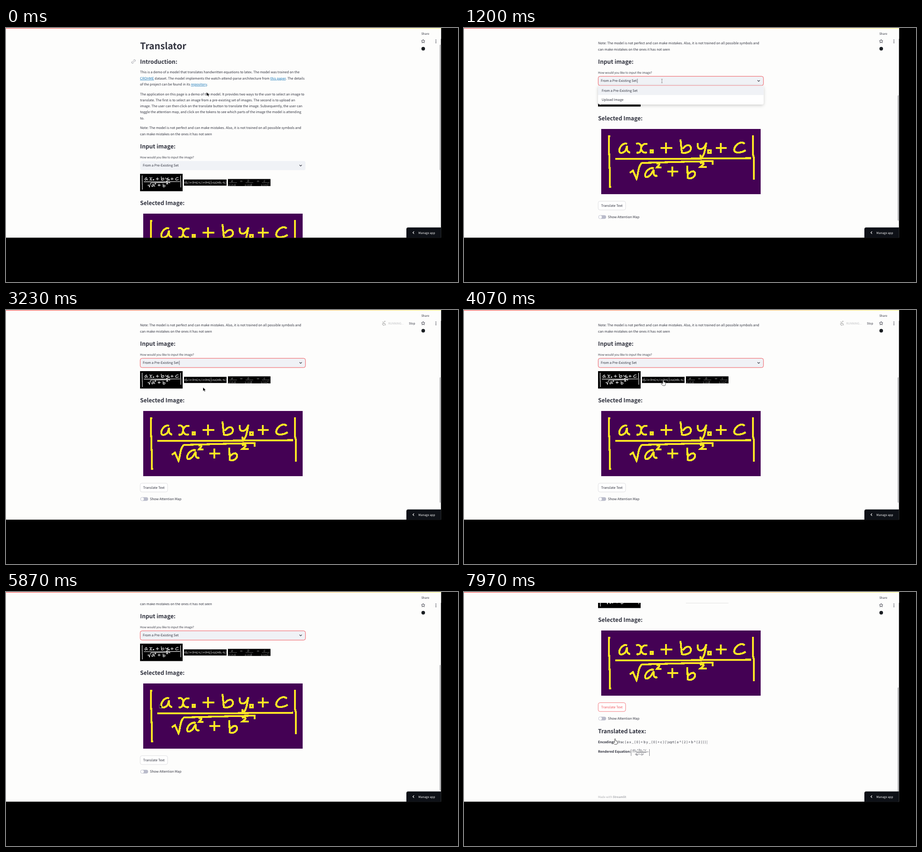
Write an HTML page that moves like this. It is 998x561 px and loops after 8 s.

```html
<!DOCTYPE html>
<html lang="en">
<head>
<meta charset="utf-8">
<title>Translator</title>
<style>
html, body { margin: 0; height: 100%; overflow: hidden; background: #000; }
svg { display: block; width: 100vw; height: 100vh; }
text {
  font: 7.42px "Noto Sans CJK JP", "Noto Sans CJK SC", "Noto Sans CJK", "Noto Sans", sans-serif;
  fill: #31333f; text-rendering: geometricPrecision; white-space: pre;
}
.bold { font-weight: 700; }
.link { fill: #1a78b8; text-decoration: underline; }
.ink { fill: none; stroke: currentColor; }
.math { font-family: "Liberation Serif", serif; font-style: italic; }
.sine { font-family: "Liberation Sans", sans-serif; font-style: italic; fill: #999; }
.light { fill: #fff; font-weight: 500; }
</style>
</head>
<body>
<svg id="stage" viewBox="0 0 998 561"></svg>
<script>
const PAGE_W = 960.6, PAGE_H = 463.3, TOP = 62, LINE = 13.29, DARK = '#31333f', RED = '#f0555c';
const LOOP = 8000;

const text = (x, y, s, size = 7.42, attrs = '') =>
  `<text x="${x}" y="${y}" style="font-size:${size}px" ${attrs}>${s}</text>`;
const heading = (y, s) => text(296, y, s, 12.55, 'class="bold"');
const lines = (y, ...rows) => rows.map((s, i) => text(296, y + i * LINE, s)).join('');
const link = s => `<tspan class="link">${s}</tspan>`;
const box = (x, y, w, h, fill, attrs = '') =>
  `<rect x="${x}" y="${y}" width="${w}" height="${h}" fill="${fill}" ${attrs}/>`;
const stroke = (d, color, w, attrs = '') =>
  `<path d="${d}" fill="none" stroke="${color}" stroke-width="${w}" ${attrs}/>`;
const plus = (x, y, r) => `M${x - r - 1} ${y}h${2 * r + 2}M${x - 1} ${y - r}v${2 * r}`;

// Handwritten fraction, in a 352 x 144 box
const fraction = [
  'M20 16h-3v40h1v30h1v42h3', 'M335 14v42l2 8v48',
  'M57 33c-8-4-18 8-17 16c1 7 11 4 15-4l2-8c-1 7-1 14 7 15',
  'M77 33c8-3 12 2 11 10s-4 11-10 9M102 33c-8-2-14 4-14 10s5 11 13 9',
  'M109 47h5v5h-5z', plus(144, 42, 12),
  'M175 23l3 29c4 2 20 1 20-9s-12-9-18 1',
  'M213 31c-1 10 2 14 8 13s10-8 11-14c-2 12-3 22-7 29s-8 2-5-2',
  'M236 47h6v6h-6z', plus(265, 42, 11),
  'M317 33c-6-6-16-2-21 6s-2 13 6 13s12-2 17-5',
  'M31 66H150L331 64.5',
  'M63 97l7-5l8 18c4-10 3-28 12-35l90-2.5l66-1.5v8',
  'M116 87c-8-3-18 6-19 14s7 6 13-1l6-10c-1 8 0 16 8 13',
  'M122 77c4-3 8-1 6 2l-5 6h10', plus(158, 94, 11),
  'M190 81l1 27c6 3 16-1 16-9s-8-7-15 1',
  'M218 76c5-3 10 0 7 3l-6 5h14'
].join('');

// Handwritten line of sines, in a 352 x 51 box: one glyph and its x per token
const glyphs = {
  r: 'm0 19l2 14c0-8 2-14 7-14', s: 'm8 18c-7-3-10 4-5 6s4 8-4 7',
  i: 'm2 22l-2 9h2m1-13v1', n: 'm1 21l-1 10c3-8 7-11 8-8s-2 8 1 8',
  '(': 'm6 13c-6 5-7 17-2 23', ')': 'm0 13c6 5 7 17 1 23',
  '[': 'm7 9c-7 9-8 25-1 33', ']': 'm3 5c7 10 7 32-2 41',
  o: 'm5 18c-7 2-7 14-1 14s8-14 1-14m-5 7h10',
  0: 'm2 28c-4 2-2 6 0 6s4-5 0-6', 1: 'm0 29l2-2v8m-2 0h4',
  '-': 'm0 26h7', '=': 'm0 25h9m-9 4h9'
};
const sines = ('r6 [14 r21 028 s37 i48 n54 (69 o76 -87 o95 0105 )111 -118 r127 1135 s144 i156 n162 ' +
  '(175 o182 -191 o199 1210 )213 ]219 =229 r242 0250 r256 1264 s268 i277 n279 (288 o294 1305 -312 o324 0335 )342')
  .split(' ').map(k => `M${k.slice(1)} 0${glyphs[k[0]]}`).join('');

const ratio = (x, top, bottom) =>
  text(x + 6, 340, top, 7, 'class="sine"') + stroke(`M${x + 2} 341.5h17`, '#999', .6) +
  text(x, 348.5, bottom, 6.6, 'class="sine" letter-spacing="1.2"');

const chain = (id, y) => `<g id="${id}" transform="translate(281.5 ${y}) rotate(-45)">` +
  stroke('M-1-2h-2a2 2 0 0 0 0 4h2M1-2h2a2 2 0 0 1 0 4h-2M-2 0h4', '#8d8f98', .9) + '</g>';

const intro = lines(100.4,
  'This is a demo of a model that translates handwritten equations to latex. The model was trained on the',
  `${link('CROHME')} dataset. The model implements the watch-attend-parse architecture from ${link('this paper')}. The details`,
  `of the project can be found in its ${link('repository')}.`) + lines(148.6,
  'The application on this page is a demo of the model. It provides two ways to the user to select an image to',
  'translate. The first is to select an image from a pre-existing set of images. The second is to upload an',
  'image. The user can then click on the translate button to translate the image. Subsequently, the user can',
  'toggle the attention map, and click on the tokens to see which parts of the image the model is attending',
  'to.') + lines(223.3,
  'Note: The model is not perfect and can make mistakes. Also, it is not trained on all possible symbols and',
  'can make mistakes on the ones it has not seen');

const selector = text(296, 287.5, 'How would you like to input the image?', 6.5) +
  box(296.3, 293.7, 364.9, 20.4, '#f0f2f6', 'id="select" rx="4" stroke-width="1"') +
  text(302, 306.3, '', 7.42, 'id="choice"') + stroke('M382.8 299v9.5', DARK, .7, 'id="caret"') +
  stroke('M648 302.3l2.6 2.6l2.6-2.6', DARK, 1.2);

const thumbs = `<g id="thumbs">
  <g transform="translate(296 322) scale(.267)" color="#fff">${box(0, 0, 352, 144, '#000')}<use href="#fraction"/></g>
  <g transform="translate(393 334.6) scale(.267)" color="#ddd">${box(0, 0, 352, 51, '#000')}<use href="#sines"/></g>
  ${box(490, 333.5, 94, 15.6, '#000')}${ratio(491, 'a', 'sinA')}${ratio(527, 'b', 'sinB')}${ratio(563, 'c', 'sinC')}
  ${stroke('M517 337.5h5m-5 2h5M554 337.5h5m-5 2h5', '#999', .6)}</g>`;

const selected = heading(390.6, 'Selected Image:') +
  `<g transform="translate(303 410)" color="#fde725">
    <g id="imageA" shape-rendering="crispEdges">${box(0, 0, 352, 144, '#440154')}<use href="#fraction"/></g>
    <g id="imageB" color="#e4e236">${box(0, 0, 352, 51, '#440154')}<use href="#sines"/></g></g>`;

const actions = `<g id="actions">
  ${box(296.3, 569.5, 60.5, 19.4, '#fff', 'id="button" rx="4" stroke-width=".8"')}
  ${text(302.7, 582, 'Translate Text', 7.42, 'id="buttonText"')}
  ${box(296.8, 600.6, 17, 8, '#b9bbca', 'rx="4"')}<circle cx="301" cy="604.6" r="3.3" fill="#fff"/>
  ${text(317.8, 607.4, 'Show Attention Map')}</g>`;

const result = `<g id="result">${heading(636.8, 'Translated Latex:')}
  ${text(296, 658.7, '<tspan class="bold">Encoding:</tspan> | \\frac { a x _ { 0 } + b y _ { 0 } + c } { \\sqrt { a ^ { 2 } + b ^ { 2 } } } |')}
  ${text(296, 680, '<tspan class="bold">Rendered Equation:</tspan>')}
  ${text(372, 676, 'ax₀+by₀+c', 7, 'class="math"')}${text(381, 685.5, 'a²+b²', 7, 'class="math"')}
  ${stroke('M371.5 678h36M377.5 683l1.2-.6l1.3 3l1.6-6h21M369 672v15M409.5 672v15', DARK, .6)}</g>`;

const header = box(0, 0, 961, 24, '#fdfdfc') + box(0, 0, 961, 1.1, 'url(#bar)') +
  text(917, 15, 'Share', 6.5) +
  stroke('M921 25.3l1.2 2.6 2.8.3-2.1 1.9.6 2.8-2.5-1.4-2.5 1.4.6-2.8-2.1-1.9 2.8-.3z', DARK, .9) +
  [26.3, 29.4, 32.5].map(y => `<circle cx="949.3" cy="${y}" r=".9" fill="${DARK}"/>`).join('') +
  '<circle cx="921.2" cy="45.8" r="4" fill="#1b1f23"/>' +
  `<g id="running">${stroke('M835 26l-2 4h4l1 4M831 27l2-1M832 29a2.6 2.6 0 1 0 4 4', '#999', 1)}
    <circle cx="836.5" cy="25" r="1.1" fill="#999"/>
    ${text(844, 31.7, 'RUNNING...', 6.4, 'opacity=".3"')}${text(889.5, 31.8, 'Stop', 6.5)}</g>`;

const popover = `<g id="popover">
  ${box(296, 127.5, 365.4, 41.5, '#fff', 'rx="4" filter="url(#shadow)"')}
  ${box(296, 128, 365.4, 20, '#f0f2f6', 'id="highlight"')}
  ${text(304, 140.6, 'From a Pre-Existing Set')}${text(304, 161.2, 'Upload Image')}</g>`;

const cursors = `<g id="cursor">
  <path id="arrow" d="M0 0v8l2-1.7 1.5 3 1.4-.7-1.4-2.8h2.6z" fill="#000" stroke="#fff" stroke-width=".4"/>
  ${stroke('M-1.5-4h3M0-4v8M-1.5 4h3', '#777', .8, 'id="beam"')}
  <path id="hand" d="M-1 0q1-1 2 0v4l4 1v4l-1 3h-5l-4-4 1-1 3 1z" fill="#fff" stroke="#333" stroke-width=".8"/></g>`;

document.getElementById('stage').innerHTML = `
<defs>
  <path id="fraction" class="ink" stroke-width="4.2" d="${fraction}"/>
  <path id="sines" class="ink" stroke-width="2" d="${sines}"/>
  <linearGradient id="bar"><stop stop-color="#ff4b4b"/><stop offset="1" stop-color="#fffd80"/></linearGradient>
  <filter id="shadow" x="-10%" y="-30%" width="120%" height="180%">
    <feDropShadow dx="0" dy="2" stdDeviation="3.5" flood-opacity=".2"/></filter>
  <clipPath id="page"><rect width="${PAGE_W}" height="${PAGE_H}"/></clipPath>
</defs>
<rect width="998" height="561"/>
<g clip-path="url(#page)">
  ${box(0, 0, PAGE_W, PAGE_H, '#fdfdfc')}
  <g id="content">
    ${text(296, 47, 'Translator', 20.2, 'class="bold"')}
    ${chain('chainIntro', 74)}${heading(78.8, 'Introduction:')}${intro}
    ${chain('chainInput', 261.5)}${heading(266.3, 'Input image:')}
    ${selector}${thumbs}${selected}${actions}${result}
    ${text(296, 0, 'Made with <tspan class="bold">Streamlit</tspan>', 6.45, 'id="footer" opacity=".4"')}
  </g>
  ${popover}${header}
  ${box(957.3, 0, 3.2, 0, '#b9b9bb', 'id="scrollbar" rx="1"')}
  <path d="M884 ${PAGE_H}v-18.8q0-4 4-4h73v24z" fill="#0e1117"/>
  ${stroke('M901 449.3l-2.7 2.7l2.7 2.7', '#fff', 1.1)}
  ${text(910.5, 454.5, 'Manage app', 6.5, 'class="light"')}
  ${cursors}
</g>`;

const el = {};
document.querySelectorAll('[id]').forEach(e => el[e.id] = e);

const scrollKeys = [[0, 0], [30, 0], [330, 122.5], [650, 187], [4300, 187], [4301, 157.5],
  [5600, 157.5], [6100, 250.5], [7480, 250.5], [7800, 325]];
const cursorKeys = [[0, 443, 142, 'arrow'], [150, 443, 142, 'beam'], [550, 443, 142, 'beam'],
  [900, 437, 117, 'beam'], [1250, 437, 117, 'hand'], [1550, 436, 156, 'hand'], [1800, 436, 156, 'arrow'],
  [2150, 437, 117, 'beam'], [2450, 437, 117, 'hand'], [2700, 436, 138, 'hand'], [2900, 436, 138, 'arrow'],
  [3230, 435, 171, 'arrow'], [3650, 440, 155, 'hand'], [4250, 440, 155, 'arrow'], [4870, 342, 207, 'arrow'],
  [5020, 343, 190, 'hand'], [5500, 343, 190, 'arrow'], [6350, 333.5, 324.5, 'hand'], [LOOP, 333.5, 324.5, 'hand']];

const lastKey = (keys, t) => keys.findLastIndex(k => k[0] <= t);
function sample(keys, t, column = 1) {
  const i = lastKey(keys, t), a = keys[i], b = keys[i + 1] || a;
  return a[column] + (b[column] - a[column]) * (t - a[0]) / (b[0] - a[0] || 1);
}
const within = (t, ...spans) => spans.some(([from, to]) => t >= from && t < to);
const show = (node, on) => node.setAttribute('display', on ? 'inline' : 'none');
const move = (node, x, y) => node.setAttribute('transform', `translate(${x} ${y})`);

function render(t) {
  const scroll = sample(scrollKeys, t);
  const wide = within(t, [4300, 5450]), translated = t >= 7450;
  const height = translated ? 850 : wide ? 682.5 : 775.5;
  const upload = within(t, [1700, 2850]);

  move(el.content, 0, -scroll);
  move(el.actions, 0, wide ? -93 : 0);
  el.footer.setAttribute('y', height - 69.6);
  el.scrollbar.setAttribute('y', (scroll + TOP) * PAGE_H / height);
  el.scrollbar.setAttribute('height', PAGE_H * PAGE_H / height);

  show(el.chainIntro, t < 150);
  show(el.chainInput, within(t, [4650, 4950]));
  el.chainInput.setAttribute('opacity', .55);
  show(el.imageA, !wide);
  show(el.imageB, wide);
  show(el.result, translated);
  show(el.running, within(t, [1700, 2200], [2850, 3350], [3900, 4350], [5100, 5550], [6600, 7450]));

  el.choice.textContent = upload ? 'Upload Image' : 'From a Pre-Existing Set';
  el.select.setAttribute('stroke', within(t, [950, 6500]) ? RED : 'none');
  show(el.caret, within(t, [950, 1700], [2850, 3800]));
  el.thumbs.setAttribute('opacity', within(t, [1800, 2950]) ? .33 : 1);
  show(el.popover, within(t, [1000, 1700], [2350, 2850]));
  el.highlight.setAttribute('y', within(t, [1450, 1700], [2350, 2600]) ? 148 : 128);

  const hot = t >= 6350;
  el.button.setAttribute('stroke', hot ? RED : '#d6d6da');
  el.buttonText.style.fill = hot ? RED : DARK;

  const shape = cursorKeys[lastKey(cursorKeys, t)][3];
  move(el.cursor, sample(cursorKeys, t, 1), sample(cursorKeys, t, 2));
  for (const name of ['arrow', 'beam', 'hand']) show(el[name], name === shape);
}

const start = performance.now();
function tick() {
  render((performance.now() - start) % LOOP);
  requestAnimationFrame(tick);
}
tick();
</script>
</body>
</html>
```
